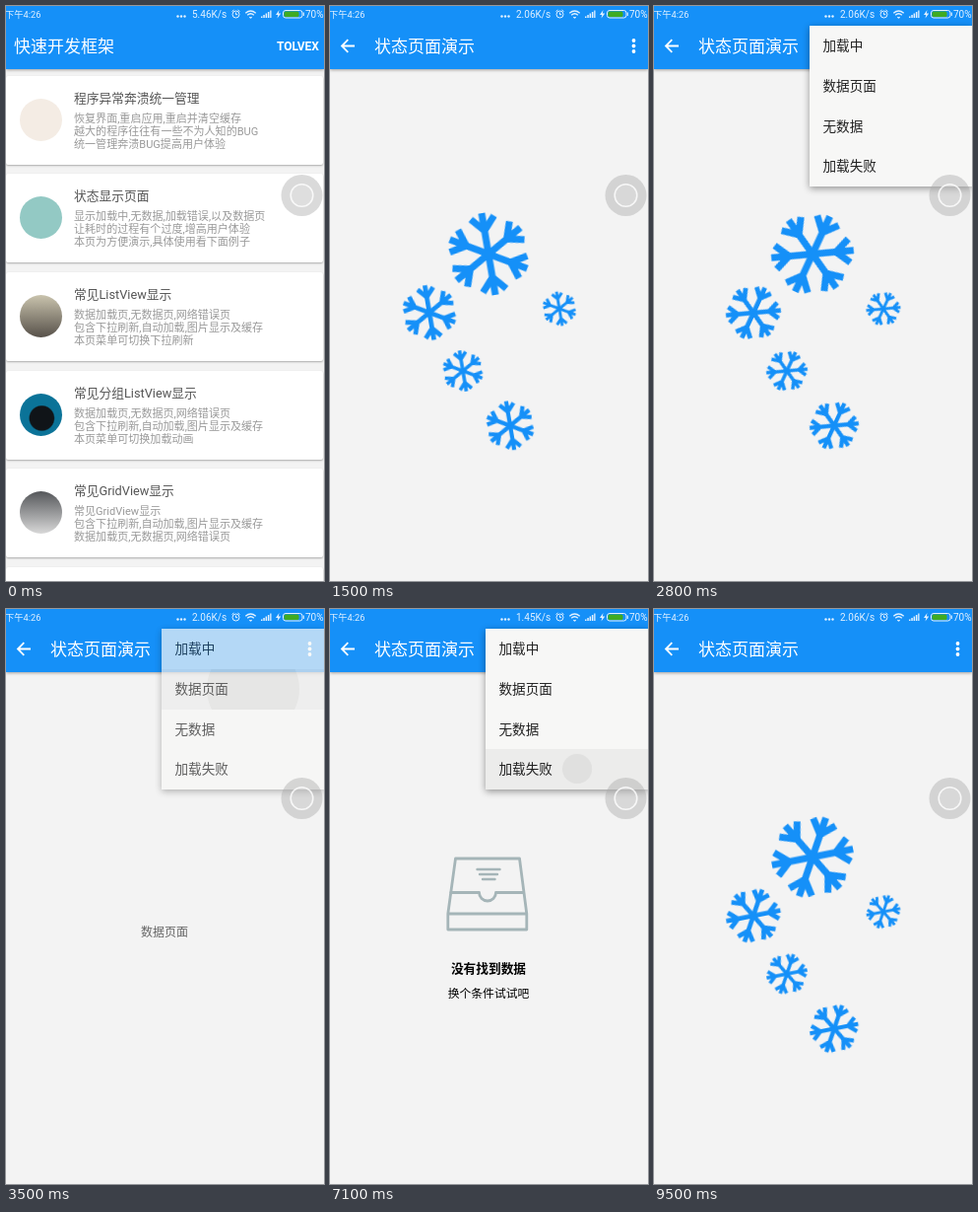
An HTML page that plays this animation: 323 by 583 pixels, repeating every 9.6 s.

```html
<!DOCTYPE html>
<html lang="zh-CN">
<head>
<meta charset="utf-8">
<title>状态页面演示</title>
<style>
  :root { --blue: #1590f8; --loop: 9600ms; }
  html, body { margin: 0; width: 100%; height: 100%; overflow: hidden; }
  body { position: relative; background: #f3f3f3; font-family: Roboto, "Noto Sans CJK SC", "Noto Sans CJK JP", sans-serif; }
  .stage { position: absolute; left: 0; top: 0; width: 323px; height: 583px; overflow: hidden; }
  .stage * { box-sizing: border-box; }
  .page, .state, .overlay { position: absolute; inset: 0; }
  .page { background: #f3f3f3; overflow: hidden; }
  .overlay { width: 323px; height: 583px; pointer-events: none; }
  .bar { position: absolute; left: 0; top: 0; width: 100%; height: 64px; background: var(--blue); box-shadow: 0 1px 3px rgba(0,0,0,.35); color: #fff; }
  .t { position: absolute; white-space: nowrap; line-height: 20px; }
  .mid { left: 0; width: 322px; text-align: center; }
  .title { top: 31px; font-size: 17px; }
  .anim { animation: var(--loop) linear -8ms infinite; }
  .hard { animation-timing-function: step-end; }

  /* list */
  .card { position: absolute; left: 0; width: 322px; height: 90px; background: #fff; border-radius: 2px; box-shadow: 0 1px 2px rgba(0,0,0,.3); overflow: hidden; }
  .face { position: absolute; left: 14px; top: 23px; width: 43px; height: 43px; border-radius: 50%; }
  .card h3 { position: absolute; left: 69px; top: 13px; margin: 0; font: inherit; font-size: 12.75px; line-height: 20px; color: #555; white-space: nowrap; }
  .card p { position: absolute; left: 69px; top: 37px; margin: 0; font-size: 11.05px; line-height: 13px; color: #999; white-space: pre; }
  .tap { position: absolute; left: 200px; top: 45px; width: 0; height: 0; }
  .tap::after, .wave { content: ""; position: absolute; border-radius: 50%; background: rgba(0,0,0,.09); }
  .tap::after { left: -210px; top: -210px; width: 420px; height: 420px; }

  /* menu */
  .menu { position: absolute; left: 158px; top: 20px; width: 165px; height: 163px; background: #f7f7f6; box-shadow: 0 2px 7px rgba(0,0,0,.4); animation-name: menu; }
  .item { position: absolute; left: 0; width: 100%; height: 41px; padding-left: 13.5px; overflow: hidden; font-size: 13.6px; line-height: 41px; color: #222; }
  .press { position: absolute; inset: 0; background: rgba(0,0,0,.045); }
  .wave { left: 46px; top: -27px; width: 94px; height: 94px; background: rgba(0,0,0,.05); }

  .btn { position: absolute; left: 125px; top: 393px; width: 72px; height: 30px; border-radius: 2px; background: #d6d7d7; box-shadow: 0 1px 2px rgba(0,0,0,.3); text-align: center; font-size: 12px; line-height: 30px; color: #222; }

  @keyframes leave { 0%, 4.167% { transform: none; animation-timing-function: ease-out; } 8.333%, 100% { transform: translateX(-30%); } }
  @keyframes enter { 0%, 4.167% { transform: translateX(101%); animation-timing-function: ease-out; } 8.333%, 100% { transform: none; } }
  @keyframes tap { 0%, .9% { transform: scale(0); opacity: 1; } 4.167% { transform: scale(1); opacity: 1; } 6.25%, 100% { transform: scale(1); opacity: 0; } }

  /* one turn takes about 3.2 s, drawn ten times a second */
  @keyframes spin {
    0% { transform: rotate(158.4deg); animation-timing-function: steps(34); }
    35.417% { transform: rotate(-222.4deg); animation-timing-function: step-end; }
    84.375% { transform: rotate(55.6deg); animation-timing-function: steps(15); }
    100% { transform: rotate(-112.4deg); }
  }
  @keyframes loading { 0% { visibility: visible; } 35.417% { visibility: hidden; } 84.375%, 100% { visibility: visible; } }
  @keyframes data { 0% { visibility: hidden; } 35.417% { visibility: visible; } 54.167%, 100% { visibility: hidden; } }
  @keyframes empty { 0% { visibility: hidden; } 54.167% { visibility: visible; } 75%, 100% { visibility: hidden; } }
  @keyframes error { 0% { visibility: hidden; } 75% { visibility: visible; } 84.375%, 100% { visibility: hidden; } }

  @keyframes menu {
    0%, 25%, 38.55%, 45.104%, 56.26%, 65.1%, 76.05%, 100% { opacity: 0; clip-path: inset(0% 0% 100% 60%); }
    28.125%, 35.729%, 47.917%, 54.479%, 68.75%, 74.271% { opacity: 1; clip-path: inset(-12px -12px -12px -12px); }
    38.542%, 56.25%, 76.042% { opacity: 0; clip-path: inset(-12px -12px -12px -12px); }
  }
  @keyframes press2 { 0% { visibility: hidden; } 32.292% { visibility: visible; } 38.542%, 100% { visibility: hidden; } }
  @keyframes press3 { 0% { visibility: hidden; } 53.125% { visibility: visible; } 56.25%, 100% { visibility: hidden; } }
  @keyframes press4 { 0% { visibility: hidden; } 73.958% { visibility: visible; } 76.042%, 100% { visibility: hidden; } }
  @keyframes wave2 { 0%, 32% { transform: scale(.2); } 36.3%, 100% { transform: none; } }
  @keyframes wave3 { 0%, 52.9% { transform: scale(.2); } 56%, 100% { transform: none; } }
  @keyframes wave4 { 0%, 73.7% { transform: scale(.2); } 76%, 100% { transform: none; } }

  @keyframes rate1 { 0% { visibility: visible; } 5.208%, 100% { visibility: hidden; } }
  @keyframes rate2 { 0% { visibility: hidden; } 5.208% { visibility: visible; } 41.667% { visibility: hidden; } 80.208%, 100% { visibility: visible; } }
  @keyframes rate3 { 0% { visibility: hidden; } 41.667% { visibility: visible; } 80.208%, 100% { visibility: hidden; } }
  .status { top: -1px; font-size: 10px; color: #e3f1ff; }
</style>
</head>
<body>
<div class="stage">
  <div class="page anim" style="animation-name:leave">
    <div id="cards"></div>
    <div class="bar">
      <div class="t title" style="left:8px">快速开发框架</div>
      <div class="t" style="right:5px;top:31px;font-size:12px;font-weight:600">TOLVEX</div>
    </div>
  </div>

  <div class="page anim" style="animation-name:enter">
    <div class="state anim hard" style="animation-name:loading">
      <svg class="overlay" id="snow" fill="none" stroke="#1590f8"></svg>
    </div>

    <div class="state anim hard" style="animation-name:data">
      <div class="t mid" style="top:318px;font-size:12px;color:#666">数据页面</div>
    </div>

    <div class="state anim hard" style="animation-name:empty">
      <svg class="overlay" fill="none" stroke="#a5b5b8" stroke-width="2.8" stroke-linejoin="round" stroke-linecap="round">
        <path d="M127.5 253H192.500L199.800 309V325H119.800V309ZM119.800 309H199.800M122.500 287.500H151.500A8.500 8.500 0 0 0 168.500 287.500H197"/>
        <path stroke-width="2.400" d="M149.500 264H172.500M152 269H170M155 274H167.500"/>
      </svg>
      <div class="t mid" style="top:355px;font-size:12.7px;font-weight:700">没有找到数据</div>
      <div class="t mid" style="top:380px;font-size:11.8px">换个条件试试吧</div>
    </div>

    <div class="state anim hard" style="animation-name:error">
      <svg class="overlay" fill="none" stroke="#a5b5b8" stroke-width="4" stroke-linecap="round">
        <path d="M123 252Q161 216 199 252M135 266Q161 242 187 266M147 279Q161 267 175 279"/>
        <circle cx="161" cy="292" r="4" fill="#a5b5b8" stroke="none"/>
      </svg>
      <div class="t mid" style="top:328px;font-size:12.7px;font-weight:700">网络连接失败</div>
      <div class="t mid" style="top:353px;font-size:11.8px">请检查网络后重试</div>
      <div class="btn">重试</div>
    </div>

    <div class="bar">
      <svg class="overlay" fill="none" stroke="#fff" stroke-width="1.8">
        <path d="M25 40.500H12.500M18.300 34.200L12 40.500L18.300 46.800"/>
        <g fill="#fff" stroke="none"><circle cx="308.500" cy="35" r="1.900"/><circle cx="308.500" cy="40.500" r="1.900"/><circle cx="308.500" cy="46" r="1.900"/></g>
      </svg>
      <div class="t title" style="left:45px">状态页面演示</div>
    </div>
  </div>

  <div class="t status" style="left:-1px;font-size:9.3px">下午4:26</div>
  <div class="t status anim hard" style="left:189px;animation-name:rate1">5.46K/s</div>
  <div class="t status anim hard" style="left:189px;animation-name:rate2">2.06K/s</div>
  <div class="t status anim hard" style="left:189px;animation-name:rate3">1.45K/s</div>
  <div class="t status" style="left:304px">70%</div>
  <svg class="overlay" fill="none" stroke="#e3f1ff">
    <g fill="#e3f1ff" stroke="none">
      <circle cx="174.500" cy="10.500" r="1.200"/><circle cx="178" cy="10.500" r="1.200"/><circle cx="181.500" cy="10.500" r="1.200"/>
      <path d="M259 12V10.500H260.500V12ZM261.300 12V9H262.800V12ZM263.600 12V7.500H265.100V12ZM265.900 12V6H267.400V12ZM268.200 12V4.500H269.500V12Z"/>
      <path d="M277.500 4L274 9H276.300L275.500 12.500L279.200 7.500H276.800Z"/>
    </g>
    <circle cx="233.500" cy="8.500" r="3.500"/>
    <path d="M233.500 6.500V8.700H235.300M229.500 5.500L231.500 4M237.500 5.500L235.500 4"/>
    <path stroke-width="1.300" d="M243.300 7.300Q248.500 2.800 253.700 7.300M245.200 9.300Q248.500 6.300 251.800 9.300M247.300 11.300L248.500 12L249.700 11.300"/>
    <rect x="281.500" y="4.500" width="19.500" height="7.500" rx="2.500"/>
    <path d="M302.300 6.500V10"/>
    <rect x="282.500" y="5.500" width="15" height="5.500" rx="1.500" fill="#3fab22" stroke="none"/>
  </svg>

  <div class="menu anim">
    <div class="item" style="top:0">加载中</div>
    <div class="item" style="top:41px"><div class="press anim hard" style="animation-name:press2"><div class="wave anim" style="animation-name:wave2"></div></div>数据页面</div>
    <div class="item" style="top:82px"><div class="press anim hard" style="animation-name:press3"><div class="wave anim" style="animation-name:wave3"></div></div>无数据</div>
    <div class="item" style="top:122px"><div class="press anim hard" style="animation-name:press4"><div class="wave anim" style="animation-name:wave4"></div></div>加载失败</div>
  </div>

  <svg class="overlay">
    <circle cx="300.500" cy="192" r="21" fill="#a8a6a7" fill-opacity=".42"/>
    <circle cx="300.500" cy="192" r="11.300" fill="#fff" fill-opacity=".12" stroke="#fff" stroke-opacity=".8" stroke-width="1.600"/>
  </svg>
</div>

<script>
  const rows = [
    ['程序异常奔溃统一管理', '恢复界面,重启应用,重启并清空缓存\n越大的程序往往有一些不为人知的BUG\n统一管理奔溃BUG提高用户体验', '#f4ece4'],
    ['状态显示页面', '显示加载中,无数据,加载错误,以及数据页\n让耗时的过程有个过度,增高用户体验\n本页为方便演示,具体使用看下面例子', '#93c9c4'],
    ['常见ListView显示', '数据加载页,无数据页,网络错误页\n包含下拉刷新,自动加载,图片显示及缓存\n本页菜单可切换下拉刷新', 'linear-gradient(#c9c3ad, #57514a)'],
    ['常见分组ListView显示', '数据加载页,无数据页,网络错误页\n包含下拉刷新,自动加载,图片显示及缓存\n本页菜单可切换加载动画', 'radial-gradient(circle at 52% 58%, #101418 36%, #0b7398 40%)'],
    ['常见GridView显示', '常见GridView显示\n包含下拉刷新,自动加载,图片显示及缓存\n数据加载页,无数据页,网络错误页', 'linear-gradient(#55575a, #d8d8d8)'],
    ['', '', 'none']
  ];
  document.getElementById('cards').innerHTML = rows.map(([name, text, tone], i) =>
    `<div class="card" style="top:${70.7 + i * 99.6}px"><div class="face" style="background:${tone}"></div>
     <h3>${name}</h3><p>${text}</p>${i === 1 ? '<div class="tap anim" style="animation-name:tap"></div>' : ''}</div>`).join('');

  // x, y, radius
  const flakes = [[161, 251.5, 42], [101, 311, 28], [233, 307, 17.5], [135, 370, 21], [183, 425.5, 25]];
  const arm = 'M0 0V-42M-12 -37.5L0 -24L12 -37.5';
  const arms = [0, 60, 120, 180, 240, 300].map(a => `<path d="${arm}" transform="rotate(${a})"/>`).join('');
  document.getElementById('snow').innerHTML = flakes.map(([x, y, r]) =>
    `<g transform="translate(${x} ${y}) scale(${r / 42})"><g class="anim" style="animation-name:spin" stroke-width="7">${arms}</g></g>`).join('');
</script>
</body>
</html>
```
